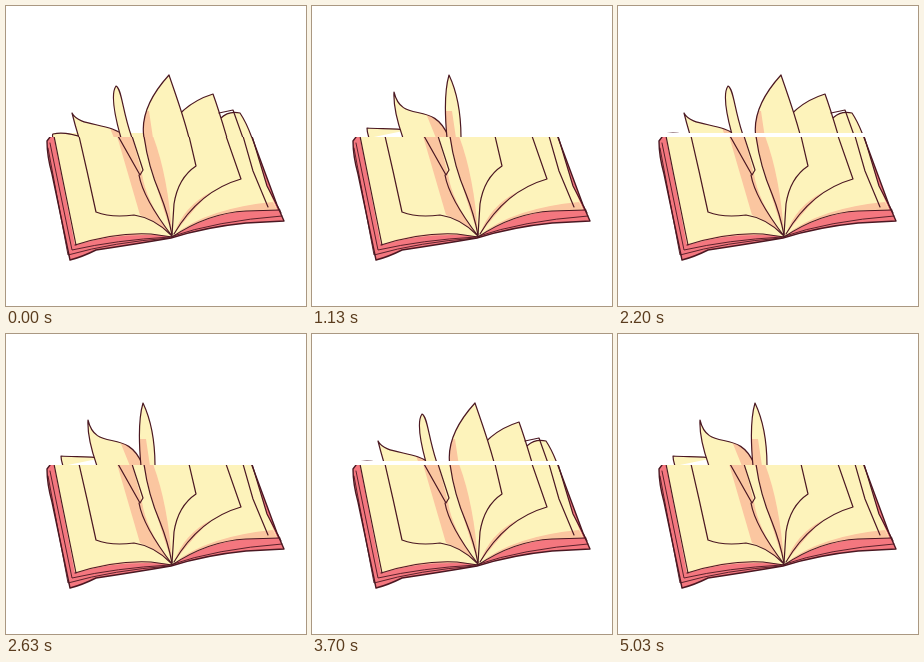
These frames come from a looping animation (300x300 px, 5.1 s). An HTML page with a canvas:

```html
<!DOCTYPE html>
<html lang="en">
<head>
<meta charset="utf-8">
<title>Book with turning pages</title>
<style>
html, body { margin: 0; width: 100%; height: 100%; overflow: hidden; background: #fff; }
canvas { display: block; }
</style>
</head>
<body>
<canvas id="stage" width="300" height="300"></canvas>
<script>
const ctx = document.getElementById('stage').getContext('2d');
const CREAM = '#fdf3bb', SHADE = '#fbc6a0', PINK = '#f4777f', INK = '#4b1822';
const LOOP = 5100, POSES = 6, CUT = 131;

// Turning stages, right to left: [stage, foot, bend, tip, bend, bend, foot]
const STAGES = [
  [0, 203, 132, 214, 102, 234, 107, 238, 113, 242, 121, 246, 132],
  [1, 158, 132, 172, 99, 207, 88, 211, 99, 216, 115, 221, 132],
  [2, 138, 132, 133, 102, 163, 69, 168, 84, 177, 108, 183, 132],
  [2.5, 135, 132, 131, 90, 137, 69, 146, 88, 149, 108, 149, 132],
  [3, 115, 132, 103, 90, 110, 80, 116, 83, 116, 104, 126, 132],
  [3.5, 91, 132, 81, 104, 82, 86, 90, 120, 122, 92, 137, 132],
  [4, 73, 132, 69, 119, 66, 107, 74, 122, 104, 115, 121, 132],
  [4.5, 57, 132, 55, 126, 55, 122, 66, 123, 82, 122, 96, 124],
  [5, 47, 132, 46, 129, 47, 128, 55, 126, 62, 127, 80, 132]
];

function fill(path, color) {
  ctx.fillStyle = color;
  ctx.fill(new Path2D(path));
}

function ink(path, width = 1.2) {
  ctx.strokeStyle = INK;
  ctx.lineWidth = width;
  ctx.stroke(new Path2D(path));
}

function clipped(top, bottom, draw) {
  ctx.save();
  ctx.beginPath();
  ctx.rect(0, top, 300, bottom - top);
  ctx.clip();
  draw();
  ctx.restore();
}

function shapeAt(stage) {
  const next = Math.max(1, STAGES.findIndex(s => s[0] >= stage));
  const a = STAGES[next - 1], b = STAGES[next];
  const mix = (stage - a[0]) / (b[0] - a[0]);
  return a.map((v, i) => v + (b[i] - v) * mix).slice(1);
}

function drawPage(stage) {
  const [ax, ay, bx, by, tx, ty, cx, cy, dx, dy, ex, ey] = shapeAt(stage);
  const outline = `M${ax} ${ay}Q${bx} ${by} ${tx} ${ty}C${cx} ${cy} ${dx} ${dy} ${ex} ${ey}`;
  fill(outline + 'Z', CREAM);
  ctx.save();
  ctx.clip(new Path2D(outline + 'Z'));
  if (stage > 3.2 && stage < 4.4) fill(`M${ex - 13} 132L${ex - 24} 105H${ex}V132Z`, SHADE);
  if (stage > 0.5 && stage < 2.8) fill(`M${ax - 8} 105H${ax + 5}L${ax + 9} 132H${ax - 8}Z`, SHADE);
  ctx.restore();
  ink(outline);
}

function drawTop(pose, whole) {
  const rightSide = pose < 2 || pose > 4;
  const bottom = rightSide && !whole ? 127 : CUT;
  clipped(0, bottom, () => {
    if (whole) fill('M47 127H138L145 132H46Z', CREAM);
    Array.from({ length: POSES }, (_, k) => k + pose / POSES)
      .filter(s => s <= 5 && (rightSide || s >= 2))
      .sort((a, b) => Math.abs(b - 2.4) - Math.abs(a - 2.4))
      .forEach(drawPage);
    if (rightSide) ink('M213 107L227 104L237 132');
  });
}

function drawBase() {
  // Cover and page block
  const cover = 'M47 127L41 135Q41 150 46 168L64 254Q76 251 90 244Q130 238 165 232Q200 221 240 217L278 215L271 199L244 126Z';
  fill(cover, PINK);
  fill('M47 127L69 239Q110 227 145 228L166 231L185 120Z', CREAM);
  fill('M140 120L166 231Q202 208 240 205L271 203L261 180L246 130L242 120Z', CREAM);

  // Shadows
  fill('M111 130H126L136 168Q140 195 165 229Q149 214 134 209Z', SHADE);
  fill('M137 130H147Q162 170 166 228Q149 180 137 130Z', SHADE);
  fill('M168 228Q178 200 205 186Q190 200 168 228Z', SHADE);
  fill('M168 229Q202 202 267 196L271 204Q210 202 168 229Z', SHADE);
  fill('M69 239Q110 222 165 230Q110 226 69 239Z', SHADE);

  // Page edges
  ink('M48 130L56 170L70 239');
  ink('M73 130L81 165L90 206Q105 212 128 209Q148 212 165 229');
  ink('M112 130L134 169L137 164L126 130');
  ink('M133 169Q137 192 166 230');
  ink('M138 130Q142 160 154 188Q162 208 166 229');
  ink('M183 130L190 160Q172 172 168 198L166 229');
  ink('M220 130L235 173Q193 185 168 228');
  ink('M237 130L247 165L262 201');
  ink('M246 130L261 180L275 207');

  // Cover edges
  ink(cover, 1.4);
  ink('M69 239Q110 226 145 228L166 231Q202 207 240 205L274 204');
  ink('M44 137L66 244Q110 234 164 231Q210 215 276 210', 0.9);
  ink('M42 142L62 249Q108 236 164 232', 0.9);
}

function frame(now) {
  const t = now % LOOP;
  // Ticks alternate between 30 ms and 70 ms; the first pose is held
  const tick = Math.floor(t / 100) * 2 + (t % 100 >= 30 ? 1 : 0);
  const step = Math.max(0, tick - 2);
  ctx.fillStyle = '#fff';
  ctx.fillRect(0, 0, 300, 300);
  ctx.lineJoin = ctx.lineCap = 'round';
  drawTop(step % POSES, step === 0);
  clipped(CUT, 300, drawBase);
}

const start = performance.now();
function play() {
  frame(performance.now() - start);
  requestAnimationFrame(play);
}
play();
</script>
</body>
</html>
```
